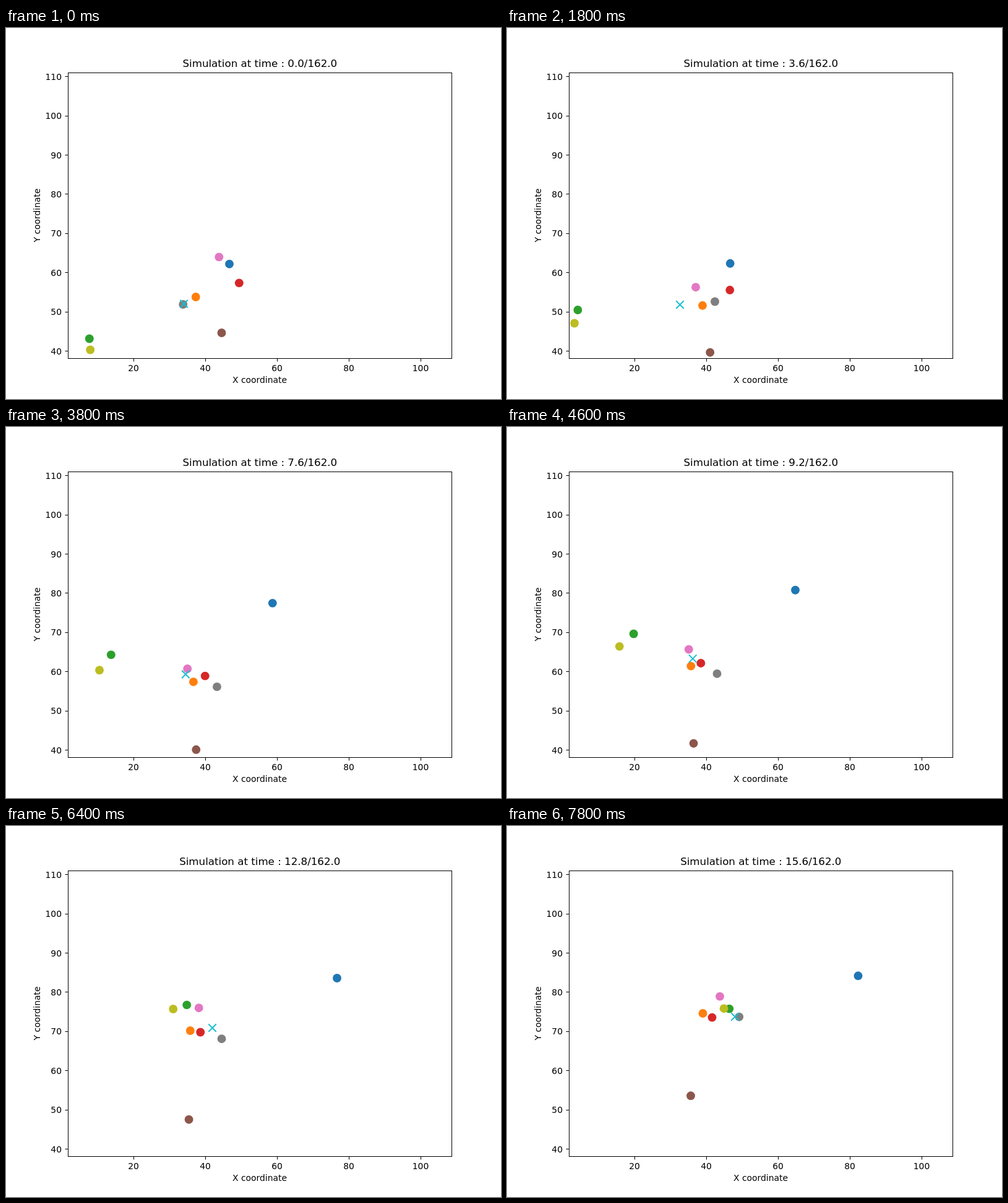
An HTML page with a canvas for the animation above (8 s loop, 800 by 600 pixels).

```html
<!DOCTYPE html>
<html lang="en">
<head>
<meta charset="utf-8">
<title>Simulation</title>
<style>
  html, body { margin: 0; width: 100%; height: 100%; overflow: hidden; background: #fff; }
  canvas { display: block; width: 800px; height: 600px; }
</style>
</head>
<body>
<canvas id="stage" width="800" height="600"></canvas>
<script>
const ctx = document.getElementById('stage').getContext('2d');
const LOOP = 8000, STEP = 200;
const FONT = '"DejaVu Sans", sans-serif';
const LEFT = 100.5, TOP = 72.5, WIDTH = 620, HEIGHT = 462;
const BOTTOM = TOP + HEIGHT;
const KEY_TIMES = [0, 1.8, 3, 6.4, 7.8];

// Natural cubic spline through the points (t[i], v[i]).
function spline(t, v) {
  const n = t.length, bend = Array(n).fill(0), c = Array(n).fill(0), d = Array(n).fill(0);
  for (let i = 1; i < n - 1; i++) {
    const a = t[i] - t[i - 1], b = t[i + 1] - t[i];
    const rhs = 6 * ((v[i + 1] - v[i]) / b - (v[i] - v[i - 1]) / a);
    const pivot = 2 * (a + b) - a * c[i - 1];
    c[i] = b / pivot;
    d[i] = (rhs - a * d[i - 1]) / pivot;
  }
  for (let i = n - 2; i > 0; i--) bend[i] = d[i] - c[i] * bend[i + 1];
  return s => {
    let i = 0;
    while (i < n - 2 && s > t[i + 1]) i++;
    const h = t[i + 1] - t[i], q = (s - t[i]) / h, p = 1 - q;
    return p * v[i] + q * v[i + 1] +
      ((p * p * p - p) * bend[i] + (q * q * q - q) * bend[i + 1]) * h * h / 6;
  };
}

// A marker gliding through one point per key time.
function mover(color, ...points) {
  const [x, y] = [0, 1].map(axis => spline(KEY_TIMES, points.map(p => p[axis])));
  return { color, at: s => [x(s), y(s)] };
}

const dots = [
  mover('#1f77b4', [361, 381.7], [360.7, 380.8], [397.3, 319], [535, 246], [567.5, 242.3]),
  mover('#ff7f0e', [306.7, 435], [316, 448.8], [309.5, 433], [297.8, 331], [316.5, 303]),
  mover('#2ca02c', [134.8, 502.5], [114.4, 456], [140.4, 405.2], [292.2, 289.4], [359.3, 295.6]),
  mover('#d62728', [376.8, 412.4], [360.2, 423.8], [335.3, 417.4], [314.2, 333.5], [331.5, 309.6]),
  mover('#8c564b', [348.5, 493], [328.2, 524.7], [314.7, 527.3], [295.6, 474.7], [297, 436.3]),
  mover('#e377c2', [344.3, 370.4], [305, 419.2], [295.5, 413.6], [311.7, 294.2], [344, 275.6]),
  mover('#7f7f7f', [286.2, 447], [336, 442.5], [342.3, 434.7], [348.5, 344.2], [375.2, 308.7]),
  mover('#bcbd22', [136.2, 520.5], [109, 477.5], [127, 431.2], [270.2, 296], [350.6, 295.2])
];
const cross = mover('#17becf', [287.5, 446], [279.5, 447.5], [283.5, 423.5], [333.5, 326.5], [368.5, 308.5]);

function line(x1, y1, x2, y2) {
  ctx.beginPath();
  ctx.moveTo(x1, y1);
  ctx.lineTo(x2, y2);
  ctx.stroke();
}

function text(str, x, y, size = 13.89, align = 'center') {
  ctx.font = `${size}px ${FONT}`;
  ctx.textAlign = align;
  ctx.fillText(str, x, y);
}

function drawMarkers(s) {
  ctx.save();
  ctx.beginPath();
  ctx.rect(LEFT, TOP, WIDTH, HEIGHT);
  ctx.clip();
  for (const dot of dots) {
    ctx.fillStyle = dot.color;
    ctx.beginPath();
    ctx.arc(...dot.at(s), 6.95, 0, Math.PI * 2);
    ctx.fill();
  }
  const [x, y] = cross.at(s), r = 6.25;
  ctx.strokeStyle = cross.color;
  ctx.lineWidth = 2;
  line(x - r, y - r, x + r, y + r);
  line(x - r, y + r, x + r, y - r);
  ctx.restore();
}

function drawAxes() {
  ctx.strokeStyle = ctx.fillStyle = '#000';
  ctx.lineWidth = 1;
  ctx.strokeRect(LEFT, TOP, WIDTH, HEIGHT);
  for (let v = 20; v <= 100; v += 20) {
    const x = 206 + (v - 20) * 5.8;
    line(x + 0.5, BOTTOM, x + 0.5, BOTTOM + 5);
    text(v, x, 555);
  }
  for (let v = 40; v <= 110; v += 10) {
    const y = 522.93 - (v - 40) * 6.3485;
    const row = Math.floor(y) + 0.5;
    line(LEFT, row, LEFT - 5, row);
    text(v, 90, Math.round(y + 5), 13.89, 'right');
  }
  text('X coordinate', 410, 574);
  ctx.save();
  ctx.translate(55, 303);
  ctx.rotate(-Math.PI / 2);
  text('Y coordinate', 0, 0);
  ctx.restore();
}

function draw(now) {
  const step = Math.floor((now % LOOP) / STEP);
  ctx.fillStyle = '#fff';
  ctx.fillRect(0, 0, 800, 600);
  drawMarkers(step * STEP / 1000);
  drawAxes();
  text(`Simulation at time : ${(step * 0.4).toFixed(1)}/162.0`, 410.3, 63, 16.67);
}

let start;
function tick(now) {
  start ??= now;
  draw(Math.max(0, now - start));
  requestAnimationFrame(tick);
}
draw(0);
requestAnimationFrame(tick);
</script>
</body>
</html>
```
